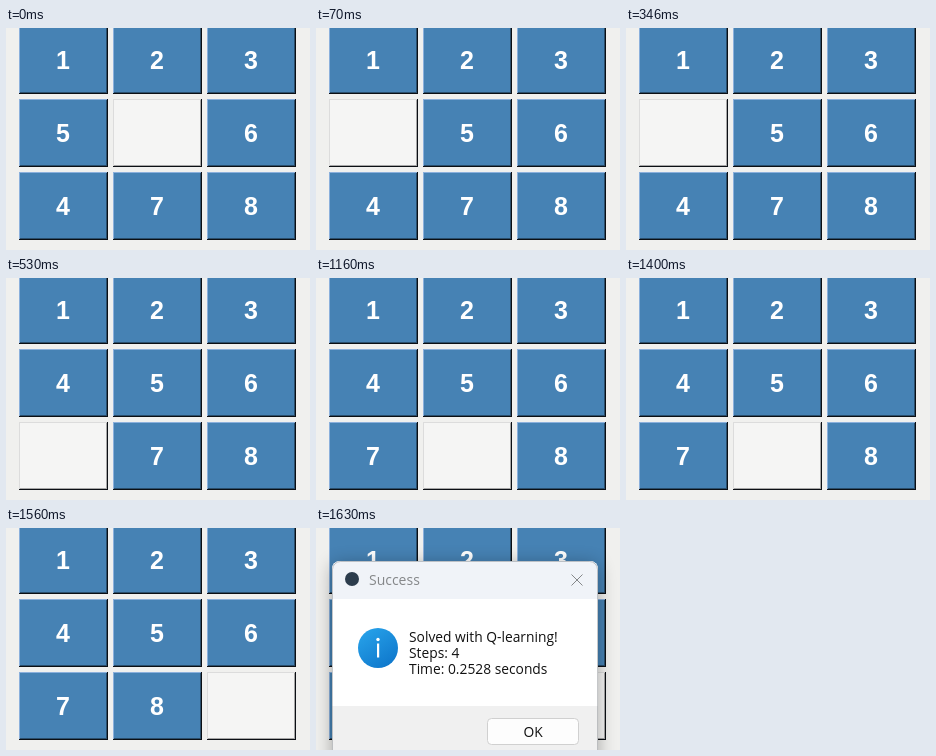
Write an HTML page with a canvas that moves like this. It is 304 px wide and 222 px high and loops after 1690 ms.

```html
<!DOCTYPE html>
<html lang="en">
<head>
<meta charset="utf-8">
<title>Sliding puzzle</title>
<style>
html, body { margin: 0; width: 100%; height: 100%; overflow: hidden; background: #f0f0ee; }
canvas { display: block; }
</style>
</head>
<body>
<canvas id="stage" width="304" height="222"></canvas>
<script>
const ctx = document.getElementById('stage').getContext('2d');
const LOOP = 1690;
const DIALOG_AT = 1630;
const START = [1, 2, 3, 5, 0, 6, 4, 7, 8];
// Each move sends the blank to a neighbouring cell.
const MOVES = [
  { at: 70, to: 3 },
  { at: 530, to: 6 },
  { at: 1160, to: 7 },
  { at: 1560, to: 8 }
];
const TILE = { w: 89, h: 68, dx: 94, dy: 73, x: 13, y: -2 };
const BLUE = { face: '#4682b4', light: '#8bb0dc', dark: '#2a4e6c' };
const BLANK = { face: '#f5f5f4', light: '#dcdcdc', dark: '#a6a6a6' };
const UI = '"Open Sans", "Noto Sans", sans-serif';

function rect(x, y, w, h, color) {
  ctx.fillStyle = color;
  ctx.fillRect(x, y, w, h);
}

function text(str, x, y, font, color, align = 'left') {
  ctx.font = font;
  ctx.fillStyle = color;
  ctx.textAlign = align;
  ctx.fillText(str, x, y);
}

function rounded(x, y, w, h, r) {
  ctx.beginPath();
  ctx.roundRect(x, y, w, h, r);
}

function disc(x, y, r, fill) {
  ctx.beginPath();
  ctx.arc(x, y, r, 0, Math.PI * 2);
  ctx.fillStyle = fill;
  ctx.fill();
}

function boardAt(t) {
  const board = START.slice();
  for (const { at, to } of MOVES) {
    if (t < at) break;
    const from = board.indexOf(0);
    board[from] = board[to];
    board[to] = 0;
  }
  return board;
}

function drawTile(value, cell) {
  const { w, h } = TILE;
  const x = TILE.x + (cell % 3) * TILE.dx;
  const y = TILE.y + Math.floor(cell / 3) * TILE.dy;
  const c = value ? BLUE : BLANK;
  rect(x, y, w, h, '#0b0f14');
  rect(x, y, w - 1, h - 1, c.light);
  rect(x + 1, y + 1, w - 2, h - 2, c.dark);
  rect(x + 1, y + 1, w - 3, h - 3, c.face);
  if (value) {
    text(value, x + 44, y + 43, 'bold 25px "Liberation Sans", Arial, sans-serif', '#fff', 'center');
  }
}

function drawDialog() {
  const x = 16, y = 33, w = 266, h = 210;
  ctx.save();
  ctx.shadowColor = 'rgba(0,0,0,0.32)';
  ctx.shadowBlur = 18;
  ctx.shadowOffsetY = 3;
  rounded(x, y, w, h, 8);
  ctx.fillStyle = '#fff';
  ctx.fill();
  ctx.restore();

  ctx.save();
  rounded(x, y, w, h, 8);
  ctx.clip();
  rect(x, y, w, 38, '#f0f3f8');
  rect(x, 71, w, 107, '#fff');
  rect(x, 178, w, 50, '#f0f0f0');
  ctx.restore();
  rounded(x + 0.5, y + 0.5, w - 1, h, 8);
  ctx.lineWidth = 1;
  ctx.strokeStyle = 'rgba(110,115,120,0.4)';
  ctx.stroke();

  disc(36, 51, 7, '#2c3c4c');
  text('Success', 53, 57, `14px ${UI}`, '#858789');
  ctx.beginPath();
  ctx.moveTo(255.5, 46.5);
  ctx.lineTo(266.5, 57.5);
  ctx.moveTo(266.5, 46.5);
  ctx.lineTo(255.5, 57.5);
  ctx.strokeStyle = '#858789';
  ctx.stroke();

  const glow = ctx.createLinearGradient(50, 102, 74, 138);
  glow.addColorStop(0, '#26a0e8');
  glow.addColorStop(1, '#0f78cc');
  disc(62, 120, 20, glow);
  disc(62, 111.5, 1.7, '#fff');
  rect(61, 115.5, 2.2, 14, '#fff');

  const lines = ['Solved with Q-learning!', 'Steps: 4', 'Time: 0.2528 seconds'];
  lines.forEach((line, i) => text(line, 93, 114 + i * 16, `13.8px ${UI}`, '#111'));

  rounded(171.5, 190.5, 91, 26, 4);
  ctx.fillStyle = '#fdfdfd';
  ctx.fill();
  ctx.strokeStyle = '#d0d0d0';
  ctx.stroke();
  text('OK', 217, 209, `13.8px ${UI}`, '#111', 'center');
}

function frame() {
  const t = performance.now() % LOOP;
  rect(0, 0, 304, 222, '#f0f0ee');
  boardAt(t).forEach(drawTile);
  if (t >= DIALOG_AT) drawDialog();
  requestAnimationFrame(frame);
}
frame();
</script>
</body>
</html>
```
